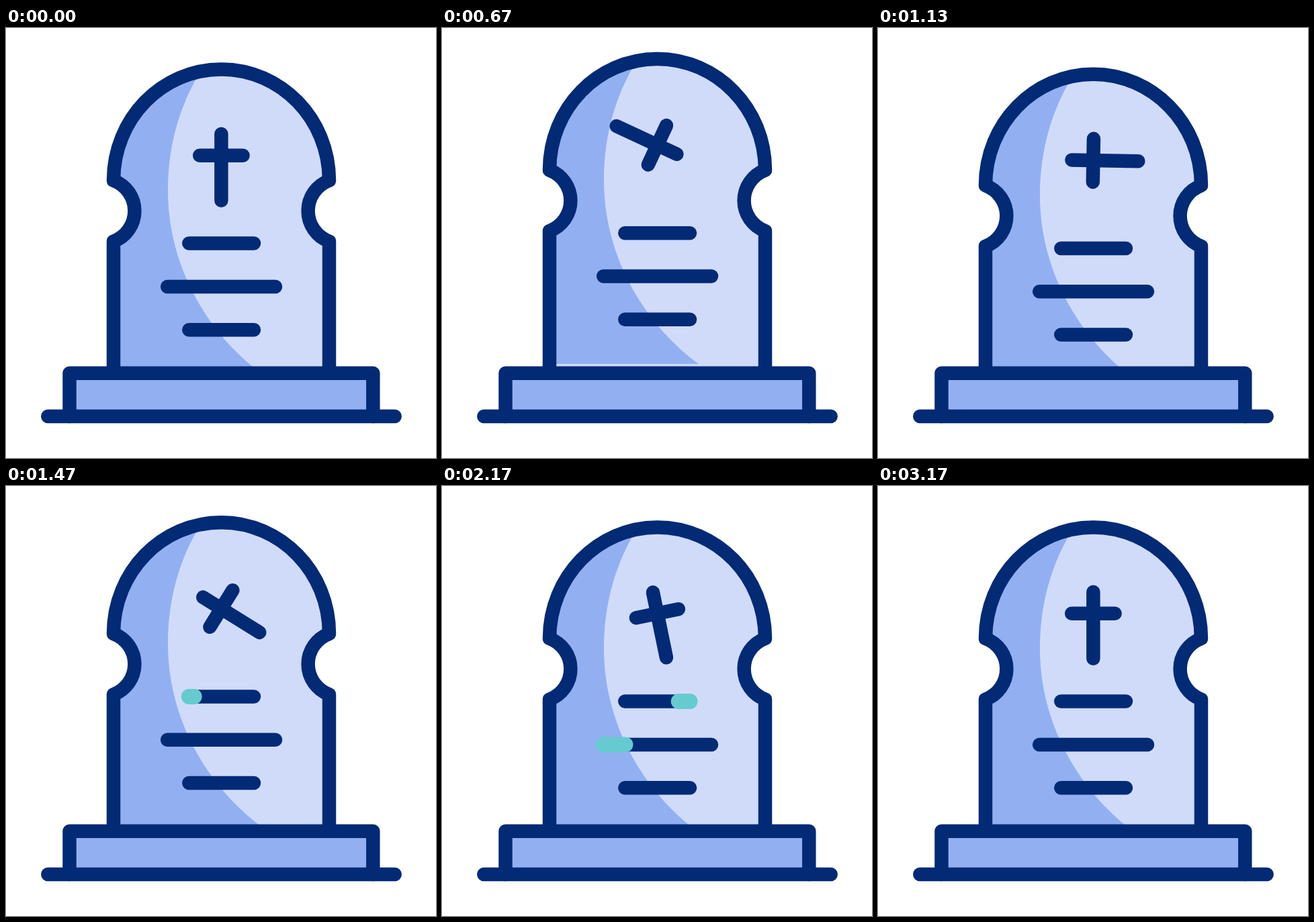
An HTML page with a canvas for the animation above (4000 ms loop, 640 by 640 pixels).

```html
<!DOCTYPE html>
<html lang="en">
<head>
<meta charset="utf-8">
<title>Tombstone</title>
<style>
html, body { margin: 0; width: 100%; height: 100%; overflow: hidden; background: #fff; }
canvas { display: block; width: 100vmin; height: 100vmin; }
</style>
</head>
<body>
<canvas id="stage" width="640" height="640"></canvas>
<script>
const ctx = document.getElementById('stage').getContext('2d');
const LOOP = 4000, FPS = 30;
const DARK = '#032a75', MID = '#92b0f1', LIGHT = '#d0dbfa', TEAL = '#66cbcf';
const STROKE = 20.5, GLINT = 23;

// [frame, value]
const hop = [[0, 0], [10, 38.4], [20, -15.4], [30, 20], [40, -16], [50, 9], [60, 0]];
// [frame, degrees, degrees per frame]
const spin = [[0, 0, 0], [10, -12, 0], [20, 115, 15], [34, 271, 5], [55, 322, 2.6], [74, 360, 0]];

// Engraved lines: ends, height, and the frames in which the glint's head and tail run
const rows = [
  { x1: 272.3, x2: 369, y: 320.6, head: [40.5, 60.5], tail: [50.3, 70.3] },
  { x1: 240.2, x2: 401, y: 384.9, head: [59.2, 79.2], tail: [66.3, 86.3] },
  { x1: 272.3, x2: 369, y: 449.2, head: [77.5, 90], tail: [83, 95] }
];

const clamp = u => Math.min(1, Math.max(0, u));
const ease = u => u * u * (3 - 2 * u);
const run = ([a, b], f) => ease(clamp((f - a) / (b - a)));

// Cubic Hermite interpolation; missing slopes count as zero
function track(keys, f) {
  for (let i = 1; i < keys.length; i++) {
    const [f0, v0, s0 = 0] = keys[i - 1], [f1, v1, s1 = 0] = keys[i];
    if (f > f1) continue;
    const d = f1 - f0, u = (f - f0) / d, e = ease(u);
    return v0 + (v1 - v0) * e + d * u * (1 - u) * (s0 * (1 - u) - s1 * u);
  }
  return keys[keys.length - 1][1];
}

function line(x1, y1, x2, y2, color = DARK, width = STROKE) {
  ctx.strokeStyle = color;
  ctx.lineWidth = width;
  ctx.lineCap = 'round';
  ctx.beginPath();
  ctx.moveTo(x1, y1);
  ctx.lineTo(x2, y2);
  ctx.stroke();
}

const stone = new Path2D(
  'M160 530V317.5A48.3 48.3 0 0 0 160 227' +
  'C160 135 232 61.4 320.5 61.4S481 135 481 227' +
  'A48.3 48.3 0 0 0 481 317.5V530');
const shade = new Path2D(
  'M292 61C258 114 241 176 241 242C241 350 296 452 382 515.5H150V61Z');
const base = new Path2D('M94.5 578V513.8H546.3V578');

function drawCross(angle) {
  ctx.save();
  ctx.translate(320.4, 189.7);
  ctx.rotate(angle * Math.PI / 180);
  line(0, -32, 0, 67);
  line(-32.2, 0, 32.2, 0);
  ctx.restore();
}

function drawRow(row, f) {
  const { x1, x2, y } = row;
  line(x1, y, x2, y);
  const head = run(row.head, f), tail = run(row.tail, f);
  if (head > tail) {
    const w = x2 - x1;
    line(x1 + w * tail, y, x1 + w * head, y, TEAL, GLINT);
  }
}

function drawStone(f) {
  ctx.save();
  ctx.translate(0, track(hop, f));
  ctx.fillStyle = LIGHT;
  ctx.fill(stone);
  ctx.save();
  ctx.clip(stone);
  ctx.fillStyle = MID;
  ctx.fill(shade);
  ctx.restore();
  ctx.strokeStyle = DARK;
  ctx.lineWidth = STROKE;
  ctx.lineCap = 'butt';
  ctx.stroke(stone);
  drawCross(track(spin, f));
  rows.forEach(row => drawRow(row, f));
  ctx.restore();
}

function drawBase() {
  ctx.fillStyle = MID;
  ctx.fill(base);
  ctx.strokeStyle = DARK;
  ctx.lineWidth = STROKE;
  ctx.stroke(base);
  line(62.3, 577.9, 578.7, 577.9);
}

function draw(ms) {
  const f = Math.floor((ms % LOOP + 4) * FPS / 1000);
  ctx.fillStyle = '#fff';
  ctx.fillRect(0, 0, 640, 640);
  ctx.lineJoin = 'round';
  drawStone(f);
  drawBase();
}

const start = performance.now();
function tick() {
  draw(performance.now() - start);
  requestAnimationFrame(tick);
}
tick();
</script>
</body>
</html>
```
